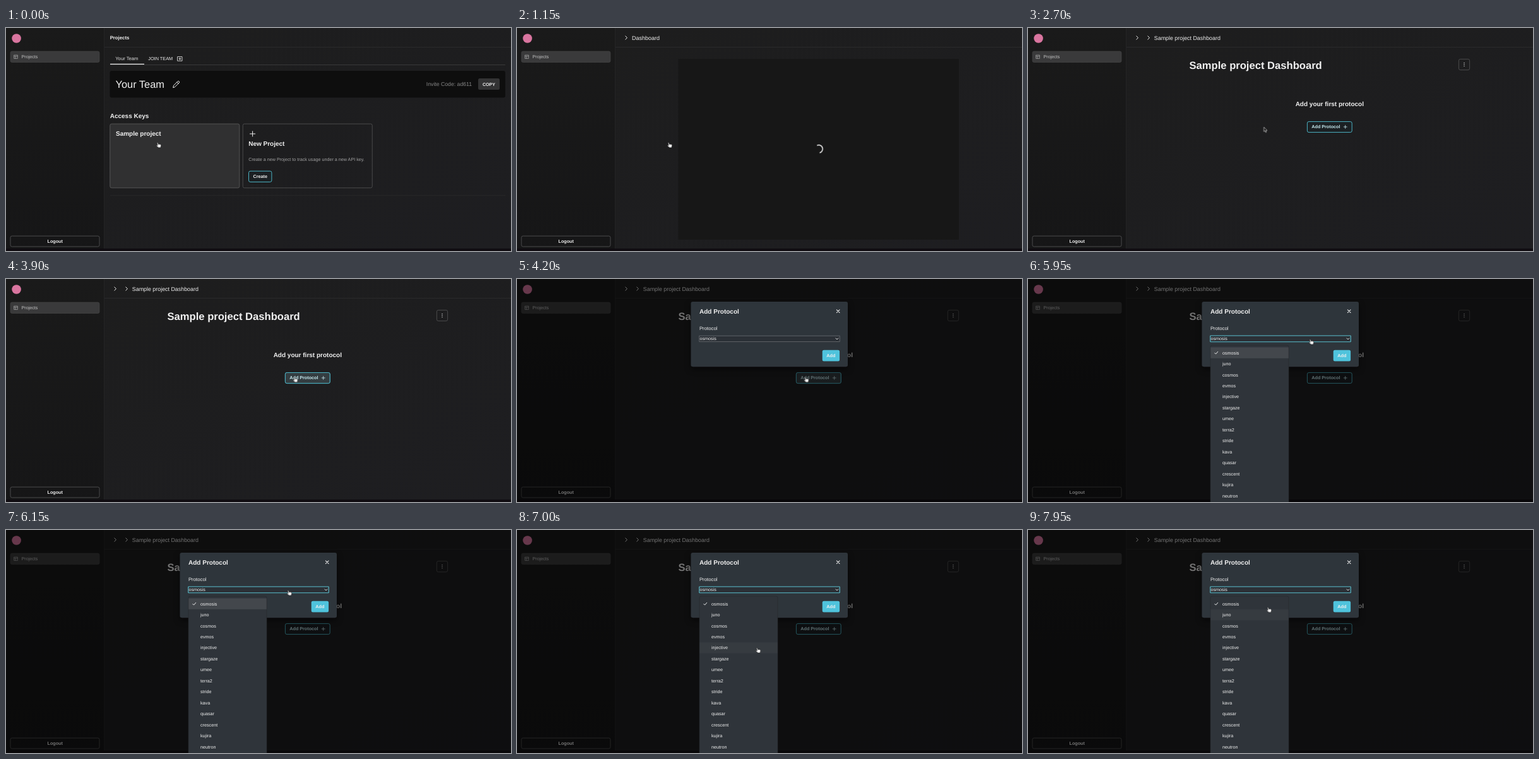
Animation, 800 px wide and 354 px high, one loop 8000 ms. Source, as an HTML page:

```html
<!DOCTYPE html>
<html lang="en">
<head>
<meta charset="utf-8">
<title>Project dashboard</title>
<style>
  html, body { margin: 0; width: 100%; height: 100%; overflow: hidden; background: #1d1d1e; }
  svg { display: block; width: 800px; height: 354px; }
  text { font: 7.2px "Liberation Sans", Arial, sans-serif; fill: #f0f0f0; text-rendering: geometricPrecision; }
  .b { font-weight: 700; }
  .mid { text-anchor: middle; }
  .h { font-size: 10px; font-weight: 700; }
  .crumb { font-size: 8.9px; }
  .line { fill: none; stroke: #f0f0f0; stroke-linecap: round; stroke-linejoin: round; }
  .edge { fill: none; stroke: #4b4b4c; }
  .teal { fill: #1b2023; stroke: #4db3c4; }

  /* one shared 8 s clock; hard cuts use step-end */
  .cut { animation: 8s step-end infinite; }
  .move { animation: 8s linear infinite; }

  #home { animation-name: home; }
  #loading { animation-name: loading; }
  #board { animation-name: board; }
  @keyframes home { 0% { opacity: 1 } 14.2%, 100% { opacity: 0 } }
  @keyframes loading { 0% { opacity: 0 } 14.2% { opacity: 1 } 21.1%, 100% { opacity: 0 } }
  @keyframes board { 0% { opacity: 0 } 21.1%, 100% { opacity: 1 } }

  #spin { transform-origin: 478px 192px; animation-name: spin; }
  @keyframes spin {
    0%, 14.375% { transform: rotate(25deg) }
    21.875%, 100% { transform: rotate(505deg) }
  }

  #hover { animation-name: hover; }
  @keyframes hover {
    0%, 37% { opacity: 0 }
    39.5%, 56.8% { opacity: 1 }
    57.5%, 100% { opacity: 0 }
  }

  #shade { animation-name: fade; }
  #modal { transform-origin: 400px 88px; animation-name: fade, grow; }
  @keyframes fade { 0%, 48.8% { opacity: 0 } 52.5%, 100% { opacity: 1 } }
  @keyframes grow {
    0%, 48.8% { transform: scale(.95) }
    52.5%, 100% { transform: none }
  }

  #focus, #menu { animation-name: open; }
  @keyframes open { 0% { opacity: 0 } 73.6%, 100% { opacity: 1 } }

  #pick { animation-name: pick; }
  @keyframes pick {
    0% { transform: none; opacity: 1 }
    83.85% { transform: translateY(17.46px); opacity: .4 }
    84.8% { transform: translateY(34.92px); opacity: .4 }
    85.8% { transform: translateY(52.38px); opacity: .4 }
    86.8% { transform: translateY(69.84px); opacity: .4 }
    87.8% { transform: translateY(87.3px); opacity: .4 }
    92.4% { transform: translateY(69.84px); opacity: .4 }
    94.15% { transform: translateY(52.38px); opacity: .4 }
    95.9% { transform: translateY(34.92px); opacity: .4 }
    97.7%, 100% { transform: translateY(17.46px); opacity: .4 }
  }

  #cursor { animation-name: travel; }
  @keyframes travel {
    0%, 27.5% { transform: translate(240px, 181.8px); animation-timing-function: ease-in }
    33.75% { transform: translate(373.3px, 157.3px); animation-timing-function: ease-out }
    38.5%, 59.375% { transform: translate(456.4px, 155.8px); animation-timing-function: ease-in-out }
    63.75%, 64.4% { transform: translate(406.6px, 102.3px); animation-timing-function: ease-in-out }
    71.5%, 80.625% { transform: translate(446.9px, 95.8px); animation-timing-function: ease-in }
    83.75% { transform: translate(405px, 120px) }
    88.75%, 90.625% { transform: translate(372px, 209px) }
    99.375%, 100% { transform: translate(380px, 122.6px) }
  }
  #hand { animation-name: hand; }
  #arrow { animation-name: arrow; }
  @keyframes hand {
    0% { opacity: 1 } 27.4% { opacity: 0 } 37% { opacity: 1 }
    56.8% { opacity: 0 } 68.5%, 100% { opacity: 1 }
  }
  @keyframes arrow {
    0% { opacity: 0 } 27.4% { opacity: 1 } 37% { opacity: 0 }
    56.8% { opacity: 1 } 68.5%, 100% { opacity: 0 }
  }
</style>
</head>
<body>
<svg viewBox="0 0 800 354">
  <defs>
    <linearGradient id="side" x2="0" y2="1">
      <stop stop-color="#1a1a1a"/><stop offset="1" stop-color="#161617"/>
    </linearGradient>
    <linearGradient id="main" x2="1" y2="1">
      <stop stop-color="#1d1d1d"/><stop offset="1" stop-color="#1e1e21"/>
    </linearGradient>
    <path id="chev" class="line" d="M171.8 12.8l2.7 2.7-2.7 2.7"/>
    <filter id="soft" x="-10%" y="-20%" width="120%" height="150%">
      <feDropShadow dx="0" dy="4" stdDeviation="5" flood-opacity=".5"/>
    </filter>
  </defs>

  <rect width="800" height="354" fill="url(#main)"/>
  <path d="M155 30.5H800" stroke="#2a2a2b"/>

  <!-- sidebar -->
  <rect width="155" height="354" fill="url(#side)"/>
  <path d="M155.5 0V350" stroke="#242425"/>
  <circle cx="16.6" cy="16.5" r="7.3" fill="#d9759f"/>
  <rect x="7" y="37" width="141" height="17.5" rx="2.5" fill="#3a3a3b" stroke="#484849" stroke-width=".6"/>
  <path class="line" d="M13 43h5.4v5.4H13zM13 44.9h5.4M14.9 44.9v3.5" stroke-width=".7" style="stroke:#aaa"/>
  <text x="24.5" y="48.2" style="fill:#c4c4c4">Projects</text>
  <rect class="edge" x="7" y="330.2" width="141" height="16.8" rx="2.5"/>
  <text class="b mid" x="77.7" y="341.1">Logout</text>

  <!-- project list -->
  <g id="home" class="cut">
    <text class="b" x="164.7" y="18.2" style="font-size:7.75px">Projects</text>
    <text x="173.2" y="51.3" style="font-size:7.7px;fill:#ddd">Your Team</text>
    <text x="225.3" y="51.2" style="font-size:7.3px">JOIN TEAM</text>
    <path class="line" d="M272 45.6h7v6.6h-7zM275.5 47.2v3.4M273.8 48.9h3.4" stroke-width=".8"/>
    <path d="M165 58.5H791" stroke="#39393a"/>
    <path d="M165 57.3H219" stroke="#e8e8e8" stroke-width="1.2"/>
    <rect x="164.5" y="68" width="626.5" height="42.5" rx="3" fill="#0e0e0e"/>
    <text x="173.5" y="94.8" style="font-size:16.4px">Your Team</text>
    <path class="line" d="M264.8 94.3l.7-3 6.5-6.6q1.2-.9 2.2.1 1 1 .1 2.2l-6.6 6.5zM270.8 86l2.2 2.2" stroke-width="1"/>
    <text x="665.8" y="92.2" style="font-size:8.7px;fill:#878787">Invite Code: ad611</text>
    <rect x="748" y="80" width="34" height="18" rx="2.5" fill="#333334"/>
    <text class="b mid" x="765" y="91.6" style="font-size:7.1px">COPY</text>

    <text class="h" x="164.7" y="143.2">Access Keys</text>
    <rect x="164.8" y="152.2" width="205" height="101.6" rx="2.5" fill="#303031" stroke="#555"/>
    <text class="h" x="174" y="171">Sample project</text>
    <rect class="edge" x="375.2" y="152.2" width="205" height="101.6" rx="2.5"/>
    <path class="line" d="M386.5 168h8.2M390.6 163.9v8.2" stroke-width="1"/>
    <text class="h" x="384.2" y="187.4">New Project</text>
    <text x="384.2" y="210.9" style="fill:#a3a3a3">Create a new Project to track usage under a new API key.</text>
    <rect class="teal" x="384.5" y="227.2" width="36.4" height="17.2" rx="2.5"/>
    <text class="b mid" x="402.7" y="238.4">Create</text>
    <path d="M165 265.8H791" stroke="#29292a"/>
  </g>

  <!-- loading -->
  <g id="loading" class="cut" opacity="0">
    <use href="#chev"/>
    <text class="crumb" x="182" y="18.6" style="font-size:9px">Dashboard</text>
    <rect x="255.5" y="49" width="444.5" height="287" fill="#171717"/>
    <path id="spin" class="line move" d="M473.6 187.6A6.2 6.2 0 0 1 482.4 196.4" stroke-width="1.5"/>
  </g>

  <!-- empty dashboard -->
  <g id="board" class="cut" opacity="0">
    <use href="#chev"/>
    <use href="#chev" x="18"/>
    <text class="crumb" x="199.8" y="18.6">Sample project Dashboard</text>
    <text class="b" x="255.5" y="64.5" style="font-size:16.6px">Sample project Dashboard</text>
    <rect class="edge" x="682.4" y="49.4" width="17.2" height="17.2" rx="2.5"/>
    <path class="line" d="M691 55.4v0M691 58v0M691 60.6v0" stroke-width="1.3"/>
    <text class="h mid" x="477.8" y="124.2">Add your first protocol</text>
    <rect class="teal" x="442.4" y="148.6" width="70.8" height="17" rx="2.5"/>
    <rect id="hover" class="move" x="442.4" y="148.6" width="70.8" height="17" rx="2.5" fill="#343d41" stroke="#4db3c4" opacity="0"/>
    <text class="b" x="449.3" y="159.4" style="fill:#c9edf3">Add Protocol</text>
    <path class="line" d="M500.2 157h5M502.7 154.5v5" stroke-width=".8" style="stroke:#c9edf3"/>
  </g>

  <rect y="350.2" width="800" height="4" fill="#100c11"/>
  <rect id="shade" class="move" width="800" height="354" fill="#000" fill-opacity=".52" opacity="0"/>

  <!-- dialog -->
  <g id="modal" class="move" opacity="0">
    <rect x="275.5" y="36" width="248.5" height="103.3" rx="3" fill="#2f343a" filter="url(#soft)"/>
    <text class="h" x="289" y="55">Add Protocol</text>
    <path class="line" d="M506.4 48.8l4.6 4.6M511 48.8l-4.6 4.6" stroke-width="1.1"/>
    <text x="288.9" y="81.2" style="font-size:7.8px">Protocol</text>
    <rect x="288.8" y="90.2" width="222.4" height="9.4" fill="#2b3036" stroke="#72767a" stroke-width=".7"/>
    <rect id="focus" class="cut" x="288.8" y="90" width="222.4" height="9.8" rx=".6" fill="#2b3036" stroke="#56bccb" stroke-width="1.1" opacity="0"/>
    <text x="289.4" y="97.3">osmosis</text>
    <path class="line" d="M504.9 94l2 2 2-2" stroke-width=".9"/>
    <rect x="483.7" y="112.8" width="27.4" height="17.8" rx="2.5" fill="#4fc3dc"/>
    <text class="b mid" x="497.3" y="124.2">Add</text>
  </g>

  <!-- options -->
  <g id="menu" class="cut" opacity="0">
    <path d="M289 354V108q0-3 3-3H410q3 0 3 3V354z" fill="#2f343a" stroke="#25292e" stroke-width=".6"/>
    <rect id="pick" class="cut" x="289.3" y="108.4" width="123.4" height="17.46" fill="#43474c"/>
    <path class="line" d="M295.9 117.4l1.6 1.7 3.2-3.7" stroke-width="1"/>
  </g>

  <g id="cursor" class="move">
    <path id="hand" class="cut" d="M-.8.6Q-.6-.3.2.1L1.6 3Q3.6 2.3 5.4 3.2 6.2 5.2 5.2 6.4L5 8H1.6Q-.4 6.6-1.8 4.8-1.6 3.6.3 4.6z" fill="#f2f2f2" stroke="#111" stroke-width=".5"/>
    <path id="arrow" class="cut" d="M0 0V7.2L1.7 5.7 2.9 8.4 4 7.9 2.9 5.3H5.1z" fill="#111" stroke="#ddd" stroke-width=".7" opacity="0"/>
  </g>
</svg>
<script>
  const names = "osmosis juno cosmos evmos injective stargaze umee terra2 stride kava quasar crescent kujira neutron";
  const menu = document.getElementById("menu");
  names.split(" ").forEach((name, i) => {
    const row = document.createElementNS("http://www.w3.org/2000/svg", "text");
    row.setAttribute("x", 308);
    row.setAttribute("y", 119.6 + i * 17.46);
    row.textContent = name;
    menu.append(row);
  });
</script>
</body>
</html>
```
